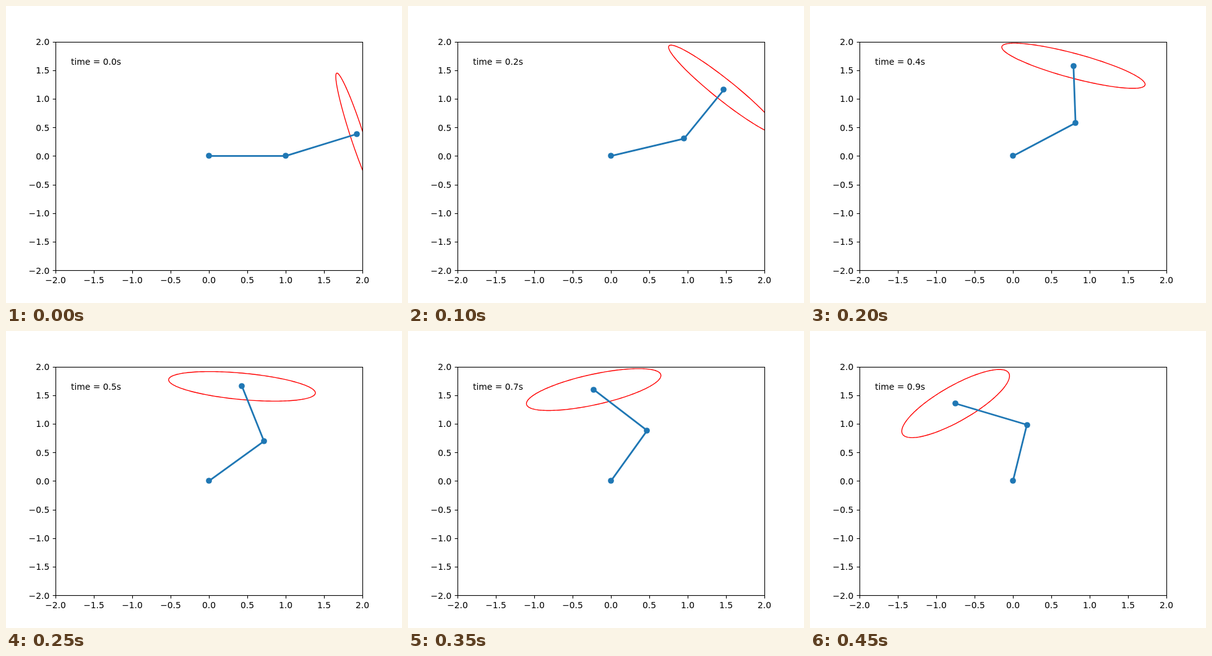
These frames come from a looping animation (640x480 px, 0.5 s). An HTML page with a canvas:

```html
<!DOCTYPE html>
<html lang="en">
<head>
<meta charset="utf-8">
<title>Two-link arm with velocity ellipse</title>
<style>
  html, body { margin: 0; width: 100%; height: 100%; overflow: hidden; background: #fff; }
  canvas { display: block; }
</style>
</head>
<body>
<canvas id="stage" width="640" height="480"></canvas>
<script>
const ctx = document.getElementById('stage').getContext('2d');
const STEP_MS = 50, STEPS = 10;
const PT = 100 / 72;
const BOX = { left: 80, right: 576, top: 57.6, bottom: 427.2 };
const RAD = Math.PI / 180;

const px = x => 328 + 124 * x;
const py = y => 242.4 - 92.4 * y;
const snap = v => Math.floor(v + 0.5) + 0.5;

function line(points, color, width) {
  ctx.beginPath();
  points.forEach(([x, y]) => ctx.lineTo(x, y));
  ctx.strokeStyle = color;
  ctx.lineWidth = width;
  ctx.stroke();
}

function label(text, x, y, align) {
  ctx.textAlign = align;
  ctx.fillText(text, x, y);
}

function drawAxes() {
  const l = snap(BOX.left), r = snap(BOX.right), t = snap(BOX.top), b = snap(BOX.bottom);
  ctx.lineJoin = 'miter';
  ctx.strokeStyle = '#000';
  ctx.lineWidth = 0.8 * PT;
  ctx.strokeRect(l, t, r - l, b - t);
  for (let v = -2; v <= 2; v += 0.5) {
    const x = snap(px(v)), y = snap(py(v));
    const text = v.toFixed(1).replace('-', '\u2212');
    line([[x, b], [x, b + 4.86]], '#000', 0.8 * PT);
    line([[l, y], [l - 4.86, y]], '#000', 0.8 * PT);
    label(text, px(v), 448, 'center');
    label(text, 70.3, Math.round(py(v) + 5.3), 'right');
  }
}

function pose(step) {
  const a = 8.836 * step * RAD;
  const b = a + (22.5 + 10.17 * step - 0.436 * step * step) * RAD;
  const elbow = [Math.cos(a), Math.sin(a)];
  const link = [Math.cos(b), Math.sin(b)];
  return { elbow, link, tip: [elbow[0] + link[0], elbow[1] + link[1]] };
}

// Image of a half-size unit circle of joint speeds under the Jacobian.
function ellipsePoints({ link, tip }) {
  return Array.from({ length: 181 }, (_, i) => {
    const u = 0.5 * Math.cos(i * 2 * RAD), w = 0.5 * Math.sin(i * 2 * RAD);
    return [px(tip[0] - tip[1] * u - link[1] * w), py(tip[1] + tip[0] * u + link[0] * w)];
  });
}

function draw(step) {
  const arm = pose(step);
  const joints = [[0, 0], arm.elbow, arm.tip].map(([x, y]) => [px(x), py(y)]);
  ctx.fillStyle = '#fff';
  ctx.fillRect(0, 0, 640, 480);

  ctx.save();
  ctx.beginPath();
  ctx.rect(BOX.left, 58, BOX.right - BOX.left, 369);
  ctx.clip();
  ctx.lineJoin = 'round';
  line(ellipsePoints(arm), '#f00', PT);
  line(joints, '#1f77b4', 2 * PT);
  ctx.fillStyle = '#1f77b4';
  for (const [x, y] of joints) {
    ctx.beginPath();
    ctx.arc(Math.round(x), Math.round(y), 3.5 * PT, 0, 2 * Math.PI);
    ctx.fill();
  }
  ctx.restore();

  ctx.fillStyle = '#000';
  ctx.font = `${10 * PT}px "DejaVu Sans", sans-serif`;
  drawAxes();
  label(`time = ${(step / 10).toFixed(1)}s`, 105, 95, 'left');
}

const start = performance.now();
function tick() {
  draw(Math.floor((performance.now() - start) / STEP_MS) % STEPS);
  requestAnimationFrame(tick);
}
tick();
</script>
</body>
</html>
```
